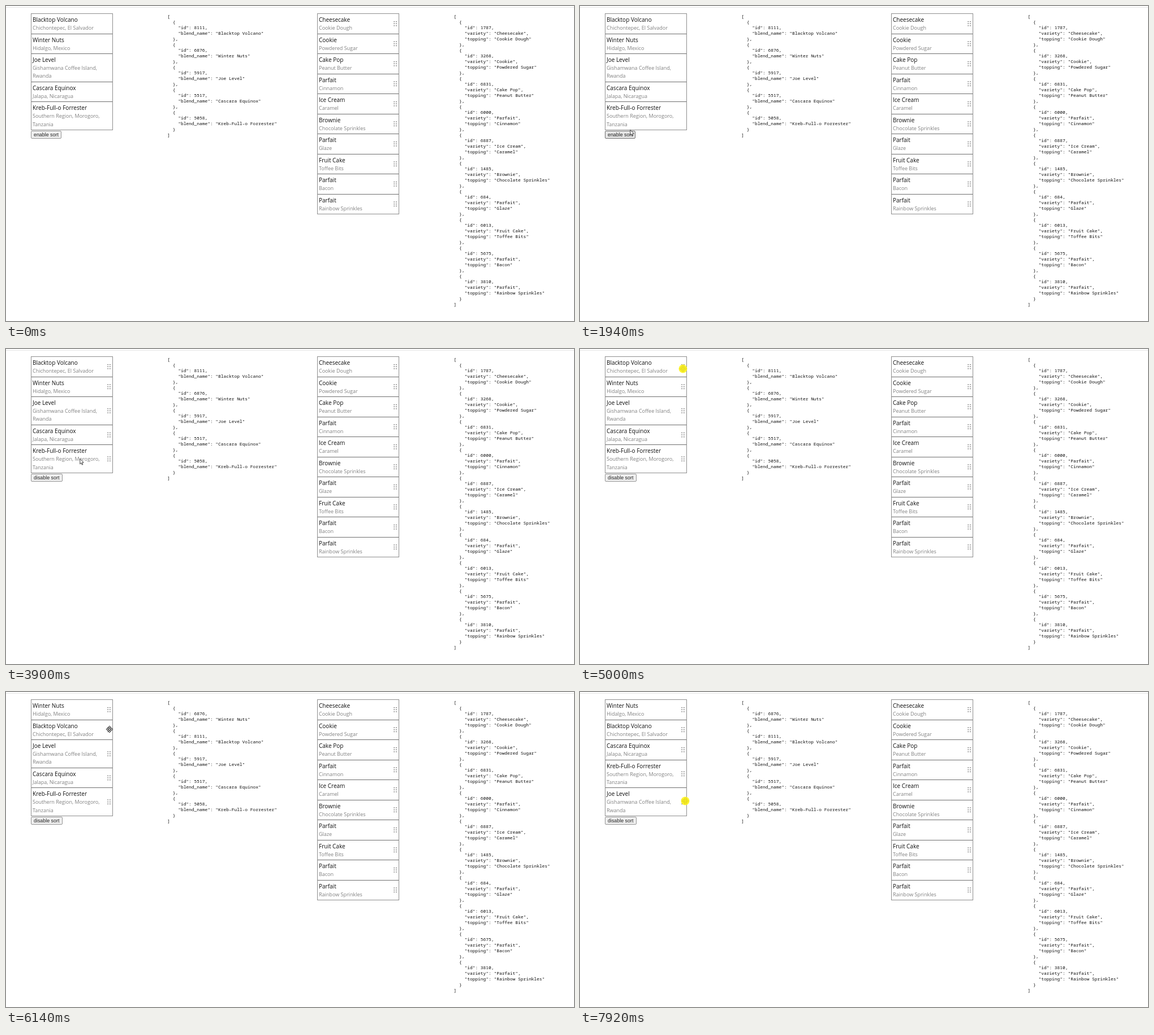
An HTML page with a canvas for the animation above (8000 ms loop, 1004 by 558 pixels).

```html
<!DOCTYPE html>
<html lang="en">
<head>
<meta charset="utf-8">
<title>Sortable lists</title>
<style>
html, body { margin: 0; width: 100%; height: 100%; overflow: hidden; background: #fff; }
canvas { display: block; width: 1004px; height: 558px; }
</style>
</head>
<body>
<canvas id="stage"></canvas>
<script>
const W = 1004, H = 558, LOOP = 8000, TICK = 66;
const canvas = document.getElementById('stage');
const ctx = canvas.getContext('2d');
const dpr = window.devicePixelRatio || 1;
canvas.width = W * dpr;
canvas.height = H * dpr;

const SANS = '"Open Sans", "Noto Sans", sans-serif';
const MONO = '"Noto Sans Mono", "DejaVu Sans Mono", monospace';
const BUTTON = '"Liberation Sans", Arial, sans-serif';
const TOP = 13.5, ROW = 35.5, LINE = 14.3;

const blends = [
  { id: 8111, name: 'Blacktop Volcano', sub: ['Chichontepec, El Salvador'] },
  { id: 6876, name: 'Winter Nuts', sub: ['Hidalgo, Mexico'] },
  { id: 5917, name: 'Joe Level', sub: ['Gishamwana Coffee Island,', 'Rwanda'] },
  { id: 5517, name: 'Cascara Equinox', sub: ['Jalapa, Nicaragua'] },
  { id: 5058, name: 'Kreb-Full-o Forrester', sub: ['Southern Region, Morogoro,', 'Tanzania'] }
];
const desserts = [
  [1787, 'Cheesecake', 'Cookie Dough'], [3268, 'Cookie', 'Powdered Sugar'],
  [6831, 'Cake Pop', 'Peanut Butter'], [6000, 'Parfait', 'Cinnamon'],
  [6887, 'Ice Cream', 'Caramel'], [1485, 'Brownie', 'Chocolate Sprinkles'],
  [684, 'Parfait', 'Glaze'], [6013, 'Fruit Cake', 'Toffee Bits'],
  [5675, 'Parfait', 'Bacon'], [3810, 'Parfait', 'Rainbow Sprinkles']
].map(([id, name, topping]) => ({ id, name, sub: [topping] }));

// Where the pointer rests, and the curves between the rests.
const entry = [865, 548], open = [163, 259], button = [88.5, 219], press = [94, 228];
const rowOne = [176, 41], grip = [182, 35], rowTwo = [183, 66], below = [184, 89];
const rowThree = [183, 104], last = [186, 195];
const moves = [
  { from: 200, to: 1000, a: entry, bend: [300, 330], b: open },
  { from: 1070, to: 1870, a: open, bend: [124, 240], b: button },
  { from: 1940, to: 2710, a: button, bend: [294, 150], b: press },
  { from: 3700, to: 4450, a: press, bend: [173, 174], b: rowOne },
  { from: 4520, to: 4800, a: rowOne, bend: [181, 32], b: grip },
  { from: 5000, to: 5610, a: grip, bend: [182, 320], b: rowTwo },
  { from: 6140, to: 6900, a: rowTwo, bend: [179, -4], b: below },
  { from: 6970, to: 7250, a: below, bend: [183, 100], b: rowThree },
  { from: 7390, to: 7920, a: rowThree, bend: [184, -82], b: last }
];

const rowHeight = item => ROW + (item.sub.length - 1) * LINE;
const within = (t, a, b) => t >= a && t < b;

function pointerAt(t) {
  const move = moves.filter(m => t >= m.from).pop();
  if (!move) return null;
  const passed = Math.floor((t - move.from) / TICK) * TICK;
  const u = Math.min(1, passed / (move.to - move.from)), v = 1 - u;
  const [x, y] = [0, 1].map(k => v * v * move.a[k] + 2 * u * v * move.bend[k] + u * u * move.b[k]);
  return { x, y };
}

function slotAt(items, y) {
  let bottom = TOP;
  const slot = items.findIndex(item => y < (bottom += rowHeight(item)));
  return slot < 0 ? items.length - 1 : slot;
}

function moveItem(items, from, to) {
  const next = items.slice();
  next.splice(to, 0, next.splice(from, 1)[0]);
  return next;
}

function text(str, x, y, font, color) {
  ctx.font = font;
  ctx.fillStyle = color;
  ctx.fillText(str, x, Math.round(y));
}

function drawHandle(x, y) {
  ctx.fillStyle = '#555';
  for (const dx of [-1.8, 1.8])
    for (const dy of [-3.6, 0, 3.6])
      ctx.fillRect(x + dx - .7, y + dy - .7, 1.4, 1.4);
}

function drawList(items, x, handles) {
  const rule = (y, color) => {
    ctx.fillStyle = color;
    ctx.fillRect(x, Math.floor(y), 145, 1);
  };
  let y = TOP;
  items.forEach((item, i) => {
    const h = rowHeight(item);
    rule(y, i ? '#6e6e6e' : '#8e8e8e');
    text(item.name, x + 3, y + 14.6, '10px ' + SANS, '#111');
    item.sub.forEach((s, n) => text(s, x + 3, y + 28.5 + n * LINE, '9px ' + SANS, '#808080'));
    if (handles) drawHandle(x + 138, y + h / 2);
    y += h;
  });
  rule(y - .5, '#8e8e8e');
  ctx.fillRect(x, 13, 1, y - 13);
  ctx.fillRect(x + 144, 13, 1, y - 13);
}

function drawJson(rows, x) {
  const lines = JSON.stringify(rows, null, 2).split('\n');
  lines.forEach((line, i) => text(line, x, 21.4 + i * 10, '7.88px ' + MONO, '#111'));
}

function drawButton(label, state) {
  const [fill, edge] = {
    idle: ['#efefef', '#8a8a8a'], hover: ['#e5e5e5', '#606060'], down: ['#f5f5f5', '#999']
  }[state];
  ctx.font = '8.9px ' + BUTTON;
  const w = Math.round(ctx.measureText(label).width + 9.5);
  ctx.beginPath();
  ctx.roundRect(44.5, 221.5, w, 13, 1.5);
  ctx.fillStyle = fill;
  ctx.fill();
  ctx.strokeStyle = edge;
  ctx.lineWidth = .9;
  ctx.stroke();
  text(label, 49, 231, ctx.font, '#222');
}

function shape(points, x, y, width) {
  ctx.beginPath();
  points.forEach(([px, py]) => ctx.lineTo(x + px, y + py));
  ctx.closePath();
  ctx.fillStyle = '#fff';
  ctx.fill();
  ctx.strokeStyle = '#111';
  ctx.lineWidth = width;
  ctx.lineJoin = 'round';
  ctx.stroke();
}

function drawArrow(x, y) {
  shape([[.4, .5], [.4, 9.8], [2.5, 7.8], [4, 11.2], [5.4, 10.6], [4, 7.3], [6.8, 7.1]], x, y, .8);
}

function drawMove(x, y) {
  const arm = [[-.8, -.8], [-.8, -3.3], [-2.4, -3.3], [0, -6], [2.4, -3.3], [.8, -3.3]];
  const points = [];
  for (let q = 0; q < 4; q++) {
    const c = Math.cos(q * Math.PI / 2), s = Math.sin(q * Math.PI / 2);
    arm.forEach(([px, py]) => points.push([px * c - py * s, px * s + py * c]));
  }
  shape(points, x, y, .9);
}

function drawPress(x, y) {
  ctx.globalAlpha = .86;
  ctx.fillStyle = '#fff314';
  ctx.beginPath();
  ctx.arc(x, y, 7.5, 0, Math.PI * 2);
  ctx.fill();
  ctx.globalAlpha = 1;
}

function draw(t) {
  const p = pointerAt(t);
  const swapped = moveItem(blends, 0, 1);
  const firstDrag = within(t, 5000, 5605), secondDrag = t >= 7450;
  const clicking = within(t, 2760, 3430);

  let order = t < 5000 ? blends : swapped;
  if (firstDrag) order = moveItem(blends, 0, slotAt(blends, p.y));
  if (secondDrag) order = moveItem(swapped, 2, slotAt(swapped, p.y));

  const hover = p && t < 4520 && within(p.x, 44, 99) && within(p.y, 218.5, 235);
  const state = within(t, 2760, 3100) ? 'down' : hover ? 'hover' : 'idle';

  ctx.setTransform(dpr, 0, 0, dpr, 0, 0);
  ctx.fillStyle = '#fff';
  ctx.fillRect(0, 0, W, H);
  ctx.fillStyle = '#e6e6e6';
  ctx.fillRect(0, 2, W, 1);

  drawList(order, 44, t >= 3430);
  drawButton(t < 3100 ? 'enable sort' : 'disable sort', state);
  drawJson((t < 5605 ? blends : swapped).map(b => ({ id: b.id, blend_name: b.name })), 285.3);
  drawList(desserts, 550, true);
  drawJson(desserts.map(d => ({ id: d.id, variety: d.name, topping: d.sub[0] })), 791.6);

  if (!p) return;
  if (t < 4520) drawArrow(p.x, p.y);
  else drawMove(p.x, p.y);
  if (clicking || firstDrag || secondDrag) drawPress(p.x, p.y);
}

const start = performance.now();
function frame() {
  draw((performance.now() - start) % LOOP);
  requestAnimationFrame(frame);
}
frame();
</script>
</body>
</html>
```
